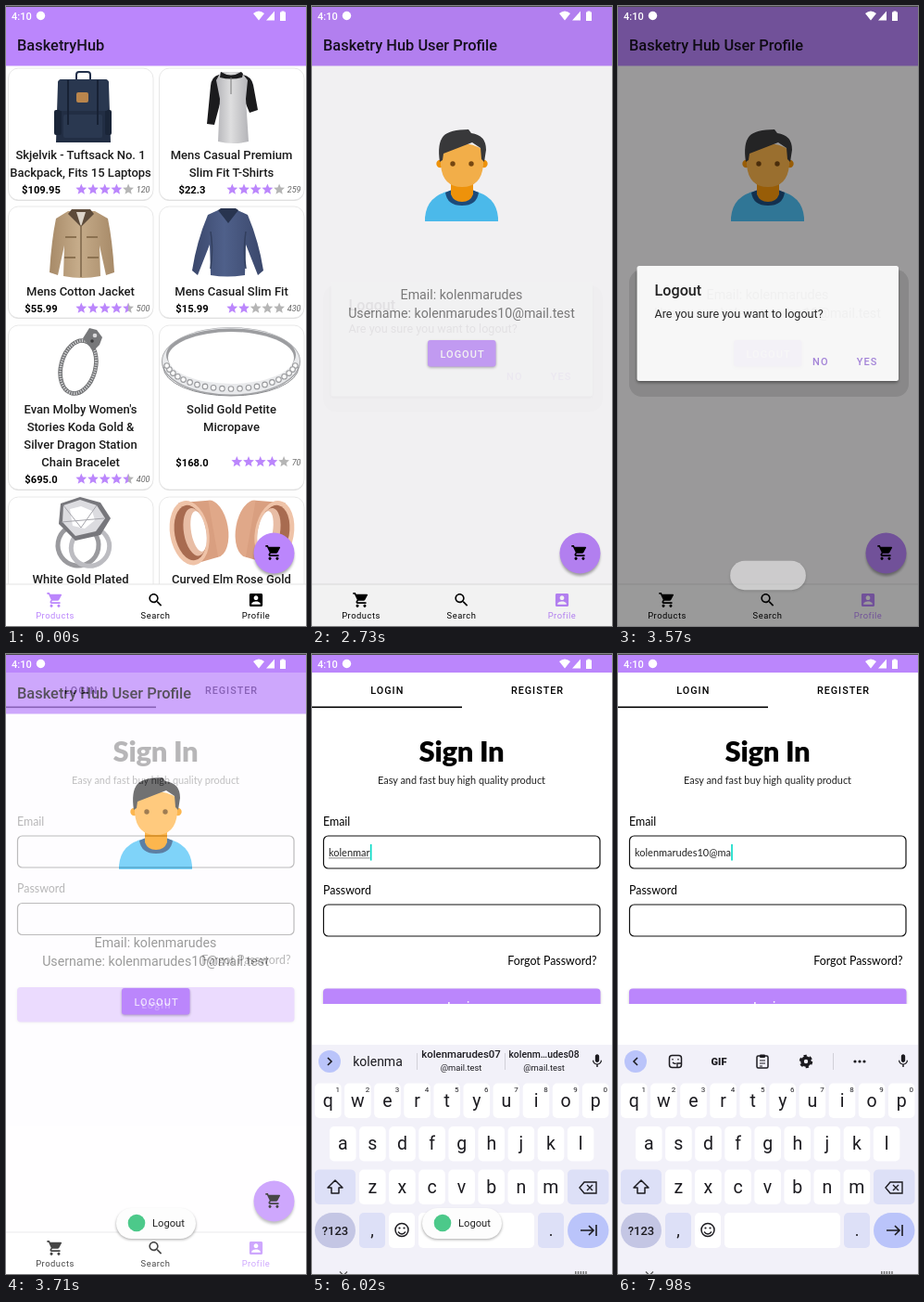
Recreate the animation shown at these times as an HTML page. Size 324x668 px, loop 8 s.

```html
<!DOCTYPE html>
<html lang="en">
<head>
<meta charset="utf-8">
<title>Shop demo</title>
<style>
html, body { margin: 0; width: 100%; height: 100%; overflow: hidden; background: #fff; }
svg { display: block; width: 100%; height: 100%; font-family: Roboto, sans-serif; }
.form { font-family: Lato, sans-serif; }
</style>
</head>
<body>
<svg id="stage" viewBox="0 0 324 668" xmlns="http://www.w3.org/2000/svg"></svg>
<script>
const PURPLE = '#bb86fc';
const USER = 'kolenmarudes', HOST = '@mail.test', MAIL = USER + '10' + HOST;

const ICON = {
  cart: 'M7 18c-1.1 0-1.99.9-1.99 2S5.9 22 7 22s2-.9 2-2-.9-2-2-2zM1 2v2h2l3.6 7.59-1.35 2.45c-.16.28-.25.61-.25.96 0 1.1.9 2 2 2h12v-2H7.42c-.14 0-.25-.11-.25-.25l.03-.12.9-1.63h7.45c.75 0 1.41-.41 1.75-1.03l3.58-6.49c.08-.14.12-.31.12-.48 0-.55-.45-1-1-1H5.21l-.94-2H1zm16 16c-1.1 0-1.99.9-1.99 2s.89 2 1.99 2 2-.9 2-2-.9-2-2-2z',
  search: 'M15.5 14h-.79l-.28-.27C15.41 12.59 16 11.11 16 9.5 16 5.91 13.09 3 9.5 3S3 5.91 3 9.5 5.91 16 9.5 16c1.61 0 3.09-.59 4.23-1.57l.27.28v.79l5 4.99L20.49 19l-4.99-5zm-6 0C7.01 14 5 11.99 5 9.5S7.01 5 9.5 5 14 7.01 14 9.5 11.99 14 9.5 14z',
  person: 'M3 5v14c0 1.1.89 2 2 2h14c1.1 0 2-.9 2-2V5c0-1.1-.9-2-2-2H5c-1.11 0-2 .9-2 2zm12 4c0 1.66-1.34 3-3 3s-3-1.34-3-3 1.34-3 3-3 3 1.34 3 3zm-9 8c0-2 4-3.1 6-3.1s6 1.1 6 3.1v1H6v-1z',
  star: 'M12 17.27L18.18 21l-1.64-7.03L22 9.24l-7.19-.61L12 2 9.19 8.63 2 9.24l5.46 4.73L5.82 21z',
  mic: 'M12 14c1.66 0 3-1.34 3-3V5c0-1.66-1.34-3-3-3S9 3.34 9 5v6c0 1.66 1.34 3 3 3zm5.3-3c0 3-2.54 5.1-5.3 5.1S6.7 14 6.7 11H5c0 3.41 2.72 6.23 6 6.72V21h2v-3.28c3.28-.48 6-3.3 6-6.72z'
};

const attrs = o => Object.entries(o).map(([k, v]) => ` ${k}="${v}"`).join('');
const text = (x, y, size, s, o = {}) => `<text x="${x}" y="${y}" font-size="${size}"${attrs(o)}>${s}</text>`;
const mid = (x, y, size, s, o = {}) => text(x, y, size, s, { 'text-anchor': 'middle', ...o });
const rect = (x, y, w, h, fill, r = 0, o = {}) =>
  `<rect x="${x}" y="${y}" width="${w}" height="${h}" rx="${r}" fill="${fill}"${attrs(o)}/>`;
const circle = (x, y, r, fill, o = {}) => `<circle cx="${x}" cy="${y}" r="${r}" fill="${fill}"${attrs(o)}/>`;
const ellipse = (x, y, rx, ry, fill, o = {}) => `<ellipse cx="${x}" cy="${y}" rx="${rx}" ry="${ry}" fill="${fill}"${attrs(o)}/>`;
const path = (d, fill, o = {}) => `<path d="${d}" fill="${fill}"${attrs(o)}/>`;
const line = (d, color, w = 1.5, o = {}) => path(d, 'none', { stroke: color, 'stroke-width': w, ...o });
const icon = (name, x, y, s, fill = '#000', o = {}) =>
  path(ICON[name], fill, { transform: `translate(${x - 12 * s} ${y - 12 * s}) scale(${s})`, ...o });
const group = (id, body, o = {}) => `<g id="${id}"${attrs(o)}>${body}</g>`;
const range = (n, f) => Array.from({ length: n }, (_, i) => f(i)).join('');
const bold = { 'font-weight': 500 };
const caps = { 'font-weight': 500, 'letter-spacing': 1 };
const soft = { filter: 'url(#soft)' };

// One gold tunnel, opening to the left
const tunnel = ellipse(224, 566, 16, 31, '#e0a889') + path('M192 532l32 3v62l-28 3z', '#d99f80') +
  ellipse(198, 566, 21, 35, '#efc3a8') + ellipse(199, 566, 17, 30, '#a86b50') +
  ellipse(204, 566, 12, 26, '#e8bda5') + ellipse(208, 566, 8, 22, '#fff');

// Product pictures as flat shapes
const art = {
  backpack: line('M76 80v-6q0-3 3-3h9q3 0 3 3v6', '#22304a', 2) +
    path('M56 84q0-5 5-5h45q5 0 5 5l2 63H54z', '#222e44') + rect(52, 112, 8, 27, '#1a2538', 2) + rect(107, 112, 7, 27, '#1a2538', 2) +
    rect(56, 79, 55, 34, '#29374f', 4) + rect(76, 93, 13, 11, '#b9854c', 2) +
    rect(62, 117, 42, 25, '#2a3850', 2) + line('M67 80v48M99 80v48', '#172134', 2),
  raglan: path('M230 74q-8 2-9 12l-4 41 8 1 8-30zM256 74q9 2 11 11l5 27-9 3-9-22z', '#1b1b1d') +
    path('M232 71h22l7 9-2 20 3 46q-17 4-33 0l2-46-4-20z', 'url(#knit)') +
    path('M232 71q11 7 22 0l2 2-1 4q-12 3-24 0z', '#1b1b1d') + line('M243 77v18', '#777', 1),
  jacket: path('M67 221l-13 8q-5 24-7 58l9 3 7-32-1 33q20 4 40 0l-1-33 7 32 9-3q-2-34-7-58l-14-8z', 'url(#tan)') +
    path('M71 219h20l4 5-14 14-14-14z', '#5d4b3a') + path('M76 222l5 16 5-16z', '#ddd5ca') +
    line('M81 236v56', '#7d6448', 1.5) + line('M64 249h12M87 249h12M63 271h12M88 271h12', '#8b7150', 2),
  sweater: path('M229 220l-11 5q-12 28-17 60l6 5 13-33 1 33q18 3 37 0l1-33 13 33 6-5q-5-32-17-60l-11-5z', 'url(#navy)') +
    path('M229 220l11 14 11-14-3-2h-16z', '#28344f') + line('M221 243q3 20 0 40M259 243q-3 20 0 40', '#323f5e', 1.5),
  bracelet: ellipse(78, 389, 18.5, 29, 'none', { stroke: '#6d6e70', 'stroke-width': 4.6, transform: 'rotate(15 78 389)' }) +
    ellipse(78, 389, 18.5, 29, 'none', { stroke: '#cfd0d2', 'stroke-width': 3, 'stroke-dasharray': '1.3 1.3', transform: 'rotate(15 78 389)' }) +
    path('M83 358l7-11 8 2 6 8-3 8-7 7-5-7z', '#77787a') + circle(96, 355, 2.3, '#d9d9db') + circle(93, 361, 1.8, '#3b3b3d'),
  band: ellipse(243, 383, 75, 37, '#a4a5a8') + ellipse(243, 382.5, 74, 36, '#e9eaec') +
    ellipse(243, 376, 70, 28.5, '#9c9da0') + ellipse(243, 379, 68, 28, '#fff') +
    line('M170 389a73 31 0 0 0 146 0', '#8e8f92', 1) +
    range(21, i => {
      const a = Math.PI * (0.07 + 0.043 * i);
      return circle(243 + 71 * Math.cos(a), 380.5 + 32 * Math.sin(a), 2.8, '#fafafa', { stroke: '#98999c', 'stroke-width': 1.1 });
    }),
  diamond: ellipse(78, 581, 22, 22, 'none', { stroke: '#9a9a9e', 'stroke-width': 5, transform: 'rotate(-35 78 581)' }) +
    ellipse(91, 583, 21, 20, 'none', { stroke: '#bcbcc1', 'stroke-width': 5, transform: 'rotate(-35 91 583)' }) +
    path('M59 536l21-7 22 6 11 17-11 18-27 6-18-18z', '#77777c') +
    path('M62 538l18-6 18 6 9 14-10 14-22 5-14-15z', '#dcdce0') +
    path('M69 542l12-3 12 5 3 10-11 9-13-3z', '#fff') + line('M62 538l19 24 17-24M60 556l46-4', '#a5a5ab', 1),
  tunnels: `<g transform="rotate(-10 208 566)">${tunnel}</g><g transform="translate(488 0) scale(-1 1) rotate(-10 208 566)">${tunnel}</g>`
};

function stars(x, y, n) {
  return range(5, i => {
    const fill = n - i >= 1 ? PURPLE : n - i > 0 ? 'url(#half)' : '#b5b5b5';
    return icon('star', x + 6.3 + 12.7 * i, y, 0.59, fill);
  });
}

// One product card: box, picture, title lines, price, rating
function card(col, y, h, pic, titles, base, price, rate, count, priceY) {
  const x = col * 163, sx = count < 100 ? 80 : 75;
  return rect(x + 2.5, y + 1, 156.5, h, '#d2d2d2', 11, { opacity: 0.7 }) +
    rect(x + 2.5, y, 156.5, h, '#fff', 11, { stroke: '#e3e3e3', 'stroke-width': 0.8 }) + art[pic] +
    titles.map((s, i) => mid(x + 80.5, base + 19 * i, 13, s, { ...bold, fill: '#1c1c1c' })).join('') +
    (price ? mid(x + 38, priceY + 4, 11.2, price, { 'font-weight': 700 }) + stars(x + sx, priceY - 0.5, rate) +
      text(x + 155.5, priceY + 3, 9, count, { 'text-anchor': 'end', 'font-style': 'italic', fill: '#666' }) : '');
}

const products = rect(0, 64, 324, 604, '#fefefe') +
  card(0, 67, 142, 'backpack', ['Skjelvik - Tuftsack No. 1', 'Backpack, Fits 15 Laptops'], 164.5, '$109.95', 4, 120, 198) +
  card(1, 67, 142, 'raglan', ['Mens Casual Premium', 'Slim Fit T-Shirts'], 164.5, '$22.3', 4, 259, 198) +
  card(0, 216, 120, 'jacket', ['Mens Cotton Jacket'], 311.5, '$55.99', 4.5, 500, 326) +
  card(1, 216, 120, 'sweater', ['Mens Casual Slim Fit'], 311.5, '$15.99', 2, 430, 326) +
  card(0, 344, 177, 'bracelet', ["Evan Molby Women's", 'Stories Koda Gold &amp;', 'Silver Dragon Station', 'Chain Bracelet'], 439, '$695.0', 4.5, 400, 510) +
  card(1, 344, 177, 'band', ['Solid Gold Petite', 'Micropave'], 439, '$168.0', 4, 70, 491.5) +
  card(0, 529, 170, 'diamond', ['White Gold Plated'], 622) +
  card(1, 529, 170, 'tunnels', ['Curved Elm Rose Gold'], 622);

const avatar = path('M122 232v-4q2-24 28-29h23q26 5 28 29v4z', '#4fc3f7') +
  path('M144 201q2 14 18 14t18-14l-7-3h-22z', '#1f4f80') +
  path('M150 190h24v13q-3 8-12 8t-12-8z', '#fb9a0b') +
  circle(138.5, 170, 4.2, '#fb9a0b') + circle(185.5, 170, 4.2, '#fb9a0b') +
  path('M139 155q23-14 46 0v16q-2 24-23 24t-23-24z', '#ffb74d') +
  path('M138 168q-3-20 4-28 7-7 27-7l3 4q16 2 16 18l-2 13-3-3-1-12-9-6-31 12-1 7z', '#3b3b3d') +
  circle(152, 170, 2.7, '#7a4a12') + circle(172, 170, 2.7, '#7a4a12');

const profile = rect(0, 64, 324, 604, '#fefdff') + avatar +
  group('info', mid(161.5, 316, 14.2, 'Email: ' + USER) + mid(161.5, 335.5, 14.2, 'Username: ' + MAIL), { fill: '#757575' }) +
  rect(125, 361.5, 73.5, 28, '#000', 3, { opacity: 0.35, ...soft }) + rect(125, 360, 73.5, 28.5, PURPLE, 3) +
  circle(161, 374, 1, '#fff', { id: 'ripple', 'clip-path': 'url(#btn)' }) +
  mid(162.5, 378.7, 11, 'LOGOUT', { ...caps, fill: '#fff' });

const tab = (x, name, label) => group('tab' + label,
  icon(name, x, 640, 0.79, 'currentColor') + mid(x, 660, 9.4, label, { 'letter-spacing': 0.5, fill: 'currentColor' }));

const chrome = rect(0, 0, 324, 64.5, PURPLE) +
  text(12, 48, 16.4, '', { ...bold, id: 'title', fill: '#17101f' }) +
  circle(289.5, 592.5, 21.5, '#000', { opacity: 0.35, ...soft }) + circle(289.5, 589.5, 22, PURPLE) + icon('cart', 289, 589, 0.79) +
  rect(0, 622.5, 324, 46, '#e4e4e4') + rect(0, 623.5, 324, 45, '#fff') +
  tab(53, 'cart', 'Products') + tab(161.5, 'search', 'Search') + tab(270, 'person', 'Profile');

const dialog = rect(12, 286, 302, 137, '#000', 14, { opacity: 0.12 }) + rect(20, 286, 283, 122, '#000', 4, { opacity: 0.4, ...soft }) +
  rect(20.5, 282, 282.5, 124, '#fff', 2.5) + text(39.5, 314, 16.2, 'Logout', { ...bold, fill: '#1a1a1a' }) +
  text(39.5, 338, 12.6, 'Are you sure you want to logout?', { fill: '#222' }) +
  mid(218.8, 388.5, 11, 'NO', { ...caps, fill: '#a583de' }) + mid(269, 388.5, 11, 'YES', { ...caps, fill: '#a583de' });

const box = (y, h, id) => rect(12.5, y, 298.5, h, '#fff', 5, { stroke: '#111', 'stroke-width': 1.2, id });
const login = rect(0, 0, 324, 668, '#fff') + rect(0, 0, 324, 20, PURPLE) +
  mid(81.3, 43, 10.8, 'LOGIN', caps) + mid(243.5, 43, 10.8, 'REGISTER', caps) + rect(0, 56.5, 162, 1.6, '#000') +
  '<g class="form">' + mid(161.5, 115.5, 31, 'Sign In', { 'font-weight': 900, 'letter-spacing': -0.3 }) +
  mid(161.5, 140, 10.9, 'Easy and fast buy high quality product', { fill: '#222' }) +
  text(12, 184.5, 12.4, 'Email') + box(196, 34, 'mailBox') +
  text(18, 218, 11, '', { id: 'typed', fill: '#222' }) + rect(18, 219.5, 0, 0.8, '#666', 0, { id: 'under' }) +
  rect(18.5, 205, 1.6, 17.5, '#03dac5', 0, { id: 'caret' }) +
  group('lower', text(12, 257, 12.4, 'Password') + box(268.5, 34, 'passBox') +
    text(307.5, 333.5, 12.4, 'Forgot Password?', { 'text-anchor': 'end' }) +
    rect(12, 360, 299.5, 37, '#000', 4, { opacity: 0.22, ...soft }) + rect(12, 359, 299.5, 37.5, PURPLE, 4) +
    mid(162.5, 381.8, 11, 'Login', { 'font-weight': 700, 'letter-spacing': 1.2, fill: '#fff' })) + '</g>' +
  rect(0, 377, 324, 291, '#fff', 0, { id: 'cover' });

const GLYPH = '#1c1b20', TINT = '#dde0f7';
const keyRow = (s, x0, y) => [...s].map((c, i) => {
  const x = x0 + 32.1 * i;
  return rect(x - 14.3, y, 28.6, 37.5, '#fff', 5) + mid(x, y + 25, 19.5, c) +
    (s.length > 9 ? mid(x + 10.5, y + 9.5, 8, (i + 1) % 10) : '');
}).join('');

const toolbar = rect(55.5, 432.5, 13, 13, 'none', 3, { stroke: GLYPH, 'stroke-width': 1.5 }) +
  line('M64 445v-4h4M59 436v1.5M65 436v1.5M59 440q2 2 4 1', GLYPH, 1.3) +
  mid(109, 443, 11, 'GIF', { 'font-weight': 900 }) +
  rect(150, 433, 12, 13, 'none', 1.5, { stroke: GLYPH, 'stroke-width': 1.5 }) + rect(153, 431.5, 6, 3.5, GLYPH, 1) +
  line('M153 438h6M153 441h6M153 444h3', GLYPH, 1) +
  circle(203, 439, 4, 'none', { stroke: GLYPH, 'stroke-width': 3.6 }) +
  circle(203, 439, 6, 'none', { stroke: GLYPH, 'stroke-width': 2.4, 'stroke-dasharray': '3.2 3.08' }) +
  rect(232, 430, 0.8, 18, '#c8c8d0') + range(3, i => circle(256 + 5 * i, 439, 1.6, GLYPH));

const offers = rect(113, 430, 0.8, 18, '#c8c8d0') + rect(208, 430, 0.8, 18, '#c8c8d0') +
  mid(161, 435, 11.4, USER + '07', bold) + mid(161, 449, 9.4, HOST) +
  mid(250.5, 435, 10.4, USER.slice(0, 6) + '…' + USER.slice(8) + '08', bold) + mid(250.5, 449, 9.4, HOST);

const keyboard = rect(0, 421, 324, 247, '#f2f1f9') + circle(19, 439, 12, '#bac4fa') +
  line('M17 435l4 4-4 4', GLYPH, 1.6, { id: 'chevron' }) + icon('mic', 308, 438.5, 0.72, GLYPH) +
  group('toolbar', toolbar) + mid(71, 444, 14, '', { id: 'word' }) + group('offers', offers) +
  keyRow('qwertyuiop', 17.3, 462.5) + keyRow('asdfghjkl', 33.3, 509) + keyRow('zxcvbnm', 65.3, 555.5) +
  rect(3, 555.5, 44, 37.5, TINT, 5) + line('M25 567l-8 8h4v6h8v-6h4z', GLYPH, 1.5, { 'stroke-linejoin': 'round' }) +
  rect(276, 555.5, 44.5, 37.5, TINT, 5) + line('M289 575l5-6h13v12h-13zM297 572l6 6M303 572l-6 6', GLYPH, 1.4) +
  rect(3, 602, 44, 38, '#c4c6e4', 19) + mid(25, 626, 13, '?123', bold) +
  rect(51, 602, 28, 38, TINT, 5) + mid(65, 627, 18, ',') +
  rect(83, 602, 28, 38, '#fff', 5) + circle(97, 620.5, 7, 'none', { stroke: GLYPH, 'stroke-width': 1.5 }) +
  circle(94.5, 618.5, 1.1, GLYPH) + circle(99.5, 618.5, 1.1, GLYPH) + line('M93 622.5q4 5 8 0', GLYPH, 1.3) +
  rect(115, 602, 125, 38, '#fff', 5) + rect(244, 602, 28, 38, TINT, 5) + mid(258, 627, 18, '.') +
  rect(276, 602, 44.5, 38, '#bac4fa', 19) + line('M290 621h13M299 616l5 5-5 5M307 615v12', GLYPH, 1.6) +
  line('M30 665.5l4 4 4-4', '#555', 1.2) + range(5, i => rect(284 + 2.8 * i, 665, 1.5, 3, '#777'));

const toast = rect(119, 599, 86, 32, '#000', 16, { opacity: 0.35, ...soft }) + rect(119, 597, 86, 33, '#fdfdfd', 16.5) +
  group('toastBody', circle(141, 613, 9.3, '#4cc98a') + text(158, 617, 11.2, 'Logout', { fill: '#222' }));

const status = text(6, 15, 11, '4:10', { ...bold, fill: '#fff' }) + circle(37.5, 10.5, 4.7, '#fff') +
  path('M267 8q6-5 12 0l-6 7.5zM281 15.5h9v-10zM296 6.5h1.5v-1h3v1h1.5v9.5h-6z', '#fff') + rect(0, 0, 324, 1, '#4a4a4a');

const shade = (id, a, b) => `<linearGradient id="${id}"><stop stop-color="${a}"/><stop offset=".45" stop-color="${b}"/><stop offset="1" stop-color="${a}"/></linearGradient>`;

const stage = document.getElementById('stage');
stage.innerHTML = `<defs>
  <filter id="soft" x="-20%" y="-30%" width="140%" height="160%"><feGaussianBlur stdDeviation="1.6"/></filter>
  <linearGradient id="half"><stop offset=".5" stop-color="${PURPLE}"/><stop offset=".5" stop-color="#b5b5b5"/></linearGradient>
  ${shade('knit', '#b4b4b8', '#dededf')}${shade('tan', '#a78a68', '#c6ac8a')}${shade('navy', '#3a476b', '#4f608a')}
  <clipPath id="btn">${rect(125, 360, 73.5, 28.5, '#fff', 3)}</clipPath></defs>` +
  rect(0, 0, 324, 668, '#fefefe') + group('products', products) + group('profile', profile) + chrome +
  rect(0, 0, 324, 668, '#000', 0, { id: 'dim' }) + group('dialog', dialog) + group('login', login) +
  group('keyboard', keyboard, { fill: GLYPH }) + group('toast', toast) + status;

const el = {};
stage.querySelectorAll('[id]').forEach(n => el[n.id] = n);
const set = (id, o) => { for (const k in o) el[id].setAttribute(k, o[k]); };
const show = (id, a) => set(id, { opacity: a, visibility: a > 0 ? 'visible' : 'hidden' });
const write = (id, s) => { if (el[id].textContent !== s) el[id].textContent = s; };
const ramp = (t, from, ms) => Math.min(1, Math.max(0, (t - from) / ms));

// Time at which the field reaches a given length
const strokes = [[5250, 1], [5460, 2], [5670, 3], [5740, 4], [5810, 5], [5880, 7], [6020, 8], [6160, 9], [6230, 10],
  [6370, 11], [6440, 12], [6930, 13], [7210, 14], [7630, 15], [7840, 16], [7980, 17]];
const typedAt = t => MAIL.slice(0, strokes.reduce((n, [at, len]) => t >= at ? len : n, 0));

function draw(t) {
  // Tabs
  const onProfile = t >= 980, swap = ramp(t, 930, 280);
  show('products', swap < 1 ? 1 : 0);
  show('profile', onProfile ? swap : 0);
  write('title', onProfile ? 'Basketry Hub User Profile' : 'BasketryHub');
  set('tabProducts', { color: onProfile ? '#000' : PURPLE });
  set('tabProfile', { color: onProfile ? PURPLE : '#000' });
  show('info', ramp(t, 1690, 150));

  // Logout dialog
  set('ripple', { r: 4 + 40 * ramp(t, 2500, 240) });
  show('ripple', t < 2520 ? 0 : 0.2 * (1 - ramp(t, 2700, 270)));
  const enter = ramp(t, 2721, 149), leave = t < 3570 ? 0 : ramp(t, 3535, 150);
  show('dialog', enter * (1 - leave ** 1.8));
  set('dialog', { transform: `translate(0 ${16 * (1 - enter) ** 1.5 - 8 * leave})` });
  show('dim', t < 3570 ? 0.6 * ramp(t, 2713, 207) : 0.6 * (1 - ramp(t, 3520, 150)));

  // Sign-in form
  show('login', ramp(t, 3640, 260));
  const focus = t >= 4970 ? 1 : 0;
  set('mailBox', { height: 34 + focus });
  set('lower', { transform: `translate(0 ${1.5 * focus})` });
  show('cover', focus);
  const s = typedAt(t);
  write('typed', s);
  const w = s ? el.typed.getComputedTextLength() : 0;
  set('caret', { x: 18.3 + w });
  show('caret', t >= 4760 ? 1 : 0);
  set('under', { width: w });
  show('under', t < 7420 ? 1 : 0);

  // Keyboard
  const rise = focus * (1 - (1 - ramp(t, 4900, 340)) ** 3);
  set('keyboard', { transform: `translate(0 ${247 * (1 - rise)})` });
  show('keyboard', focus);
  const tools = t < 5460 || t >= 7700;
  show('toolbar', focus && tools ? 1 : 0);
  show('offers', t >= 5670 && t < 7210 ? 1 : 0);
  const word = tools ? '' : typedAt(Math.min(t - 80, 7400));
  write('word', word);
  set('word', { 'font-size': Math.min(14, 146 / (word.length || 1)) });
  set('chevron', { transform: tools ? 'translate(38 0) scale(-1 1)' : '' });

  // Toast
  const pop = t < 3570 ? 0 : ramp(t, 3500, 140), size = 0.9 + 0.1 * pop;
  show('toast', pop * (1 - ramp(t, 6090, 250)));
  set('toast', { transform: `translate(162 613.5) scale(${size}) translate(-162 -613.5)` });
  set('toastBody', { opacity: ramp(t, 3590, 100) });
}

const start = performance.now();
function frame() {
  draw((performance.now() - start) % 8000);
  requestAnimationFrame(frame);
}
frame();
</script>
</body>
</html>
```
